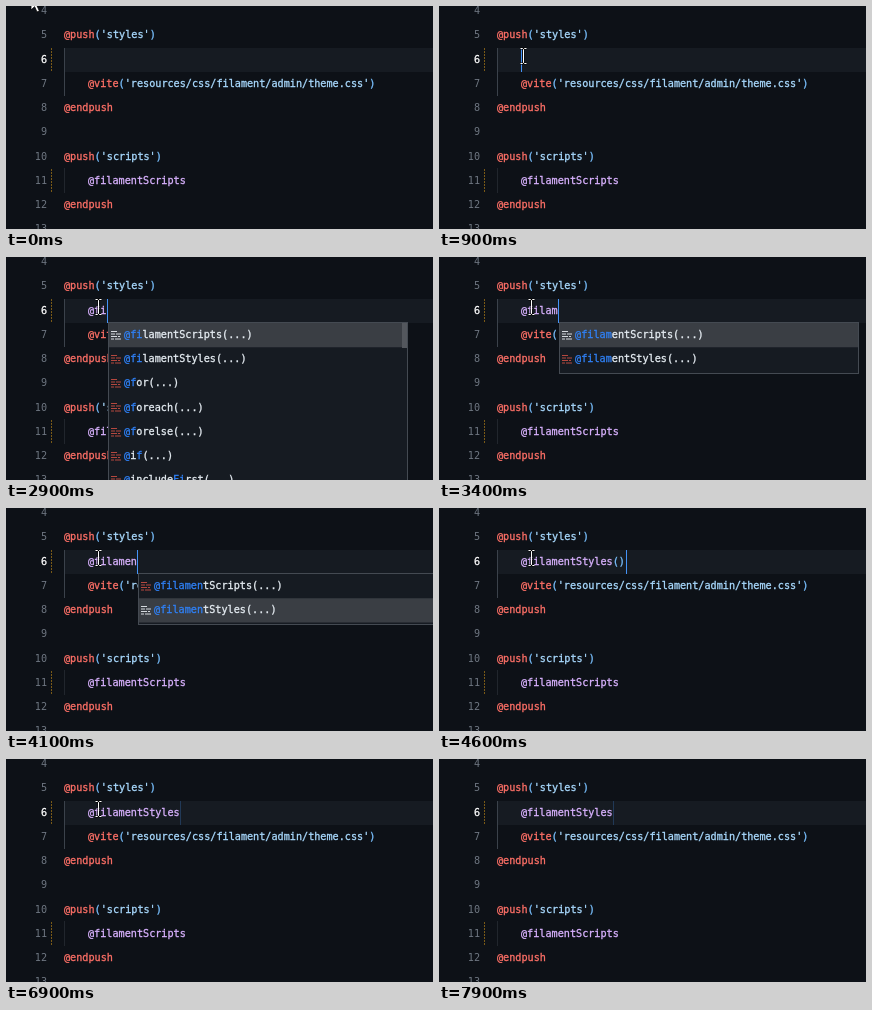
Write an HTML page that moves like this. It is 427x223 px and loops after 8000 ms.

```html
<!DOCTYPE html>
<html lang="en">
<head>
<meta charset="utf-8">
<title>Editor autocomplete</title>
<style>
html, body { margin: 0; width: 100%; height: 100%; overflow: hidden; background: #0d1117; }
svg { display: block; width: 427px; height: 223px; }
text { font: 10.17px "DejaVu Sans Mono", "Liberation Mono", monospace; white-space: pre; }
tspan { fill: currentColor; stroke: currentColor; stroke-width: .3px; }
.num { fill: #6e7681; text-anchor: end; }
.now { fill: #fff; stroke: #fff; stroke-width: .3px; }
.dir { color: #ff7067; }
.str { color: #a9daff; }
.par { color: #79c0ff; }
.fn { color: #d9b2ff; }
.plain, .item { color: #e6edf3; }
.hit { color: #2f81f7; }
</style>
</head>
<body>
<svg viewBox="0 0 427 223" xmlns="http://www.w3.org/2000/svg">
  <rect width="427" height="223" fill="#0d1117"/>
  <rect x="58" y="42" width="369" height="24" fill="#161b22"/>
  <path d="M58.5 42V90" stroke="#3b424b"/>
  <path d="M58.5 162V187" stroke="#21262d"/>
  <g stroke="#7a5a17" stroke-dasharray="2 1">
    <path id="mark" d="M45.5 42V66"/>
    <path d="M45.5 163V187"/>
  </g>
  <g id="code"></g>
  <rect id="caret" y="42" width="1" height="24" fill="#4493f8"/>
  <g id="popup"></g>
  <g id="arrow">
    <path d="M0 0V15L3.6 11.7L6 17L8.4 16L6 10.8H11Z" fill="#fff" stroke="#000" stroke-width=".8"/>
  </g>
  <g id="beam" fill="none">
    <path d="M-3 -7.5H-1L0 -6.5L1 -7.5H3M0 -6.5V6.5M-3 7.5H-1L0 6.5L1 7.5H3" stroke="#000" stroke-width="2"/>
    <path d="M-3 -7.5H-1L0 -6.5L1 -7.5H3M0 -6.5V6.5M-3 7.5H-1L0 6.5L1 7.5H3" stroke="#fff"/>
  </g>
</svg>
<script>
const LOOP = 8000, CHAR = 6.12, ROW = 24.25, LEFT = 58, INDENT = 82;
const $ = id => document.getElementById(id);
const baseline = n => Math.floor(57 + (n - 6) * ROW);
const caretX = typed => Math.ceil(INDENT + typed.length * CHAR);

const scripts = "@filamentScripts", styles = "@filamentStyles";
const pair = [scripts + "(...)", styles + "(...)"];
const all = ["@assets", "@auth", "@auth(...)", "@break", "@break(...)", "@can(...)", "@cannot(...)"];
const some = [...pair, "@for(...)", "@foreach(...)", "@forelse(...)", "@if(...)", "@includeFirst(...)"];

// time, typed text, suggestions, selected row, start of the caret's blink
const edits = [
  [0, "", null, 0, 900],
  [2200, "@", null, 0, 2000],
  [2400, "@", all, 0, 2000],
  [2800, "@f", some, 0, 2800],
  [2900, "@fi", some, 0, 2900],
  [3200, "@fila", pair, 0, 3200],
  [3400, "@filam", pair, 0, 3400],
  [3500, "@filame", pair, 0, 3500],
  [3700, "@filamen", pair, 0, 3800],
  [4100, "@filamen", pair, 1, 3800],
  [4500, styles + "()", null, 0, 4500],
  [5200, styles + "(", null, 0, 5200],
  [5600, styles, null, 0, 5900]
];

// time, pointer kind, x, y
const moves = [
  [0, "arrow", 25, -11],
  [300, "arrow", 29, -5],
  [500, "arrow", 44, 10],
  [600, "beam", 70.5, 35],
  [700, "beam", 84.5, 50],
  [1200, "beam", 92.5, 50],
  [7100, "beam", 88.5, 46],
  [7200, "beam", 82.5, 41],
  [7400, "beam", 62.5, 23],
  [7500, "arrow", 36, 3],
  [7600, "none", 0, 0]
];

const at = (list, t) => list.filter(e => e[0] <= t).pop();
const span = (cls, s) => `<tspan class="${cls}">${s}</tspan>`;
const line = (n, x, body) => `<text x="${x}" y="${baseline(n)}">${body}</text>`;

function call(name, arg, par = "par") {
  return span("dir", name) + span(par, "(") + span("str", `'${arg}'`) + span(par, ")");
}

function codeMarkup(t, typed) {
  let out = "";
  for (let n = 4; n <= 13; n++) {
    out += `<text class="num${n === 6 ? " now" : ""}" x="41" y="${baseline(n)}">${n}</text>`;
  }
  const par = t >= 5600 && t < 5800 ? "plain" : "par";
  const late = t >= 5800 && t < 6000 ? "str" : "fn";
  const [, name, brackets] = typed.match(/^([^(]*)(.*)$/);
  return out +
    line(5, LEFT, call("@push", "styles")) +
    line(6, INDENT, span(typed.length > 1 ? "fn" : "plain", name) + span("par", brackets)) +
    line(7, INDENT, call("@vite", "resources/css/filament/admin/theme.css", par)) +
    line(8, LEFT, span("dir", "@endpush")) +
    line(10, LEFT, call("@push", "scripts", par)) +
    line(11, INDENT, span(late, scripts)) +
    line(12, LEFT, span("dir", "@endpush"));
}

// Marks the typed letters in order, wherever they occur.
function highlight(label, typed) {
  let k = 0;
  return [...label].map(c => {
    const hit = k < typed.length && c.toLowerCase() === typed[k];
    if (hit) k++;
    return span(hit ? "hit" : "item", c);
  }).join("");
}

function icon(x, y, color) {
  return `<path d="M${x} ${y}h6M${x} ${y + 2.5}h4m1 0h5M${x} ${y + 5}h6m1 0h2M${x} ${y + 7.5}h3m1 0h6" stroke="${color}"/>`;
}

function popupMarkup(typed, items, selected) {
  if (!items) return "";
  const x = caretX(typed) + 1, top = 66;
  const height = Math.round(items.length * ROW + 2);
  let out = `<rect x="${x + .5}" y="${top - .5}" width="299" height="${height}" fill="#161b22" stroke="#444a52"/>`;
  items.forEach((label, i) => {
    const y = top + i * ROW, on = i === selected;
    if (on) out += `<rect x="${x + 1}" y="${y}" width="298" height="${ROW}" fill="#3a3e44"/>`;
    out += icon(x + 3, Math.floor(y) + 8.5, on ? "#d5d9de" : "#b5483f");
    out += `<text x="${x + 16}" y="${Math.floor(y + 15.3)}">${highlight(label, typed)}</text>`;
  });
  if (items.length > 2) {
    out += `<rect x="${x + 294}" y="${top}" width="5" height="25" fill="#53575d"/>`;
  }
  return out;
}

function blink(age) {
  if (age < 0) return 1;
  const p = age % 1000;
  if (p < 400) return 1 - p / 400;
  if (p < 500) return 0;
  return Math.min(1, (p - 500) / 400);
}

const shown = {};
function fill(id, markup) {
  if (shown[id] !== markup) $(id).innerHTML = shown[id] = markup;
}

function draw(t) {
  const [, typed, items, selected, start] = at(edits, t);
  fill("code", codeMarkup(t, typed));
  fill("popup", popupMarkup(typed, items, selected));

  $("caret").setAttribute("x", caretX(typed));
  $("caret").setAttribute("opacity", t < 900 ? 0 : blink(t - start - 400));
  $("mark").setAttribute("opacity", t >= 4500 && t < 5900 ? 0 : 1);

  const [, kind, x, y] = at(moves, t);
  for (const id of ["arrow", "beam"]) {
    $(id).setAttribute("visibility", id === kind ? "visible" : "hidden");
    $(id).setAttribute("transform", `translate(${x} ${y})`);
  }
}

const origin = performance.now();
function tick() {
  draw((performance.now() - origin) % LOOP);
  requestAnimationFrame(tick);
}
tick();
</script>
</body>
</html>
```
